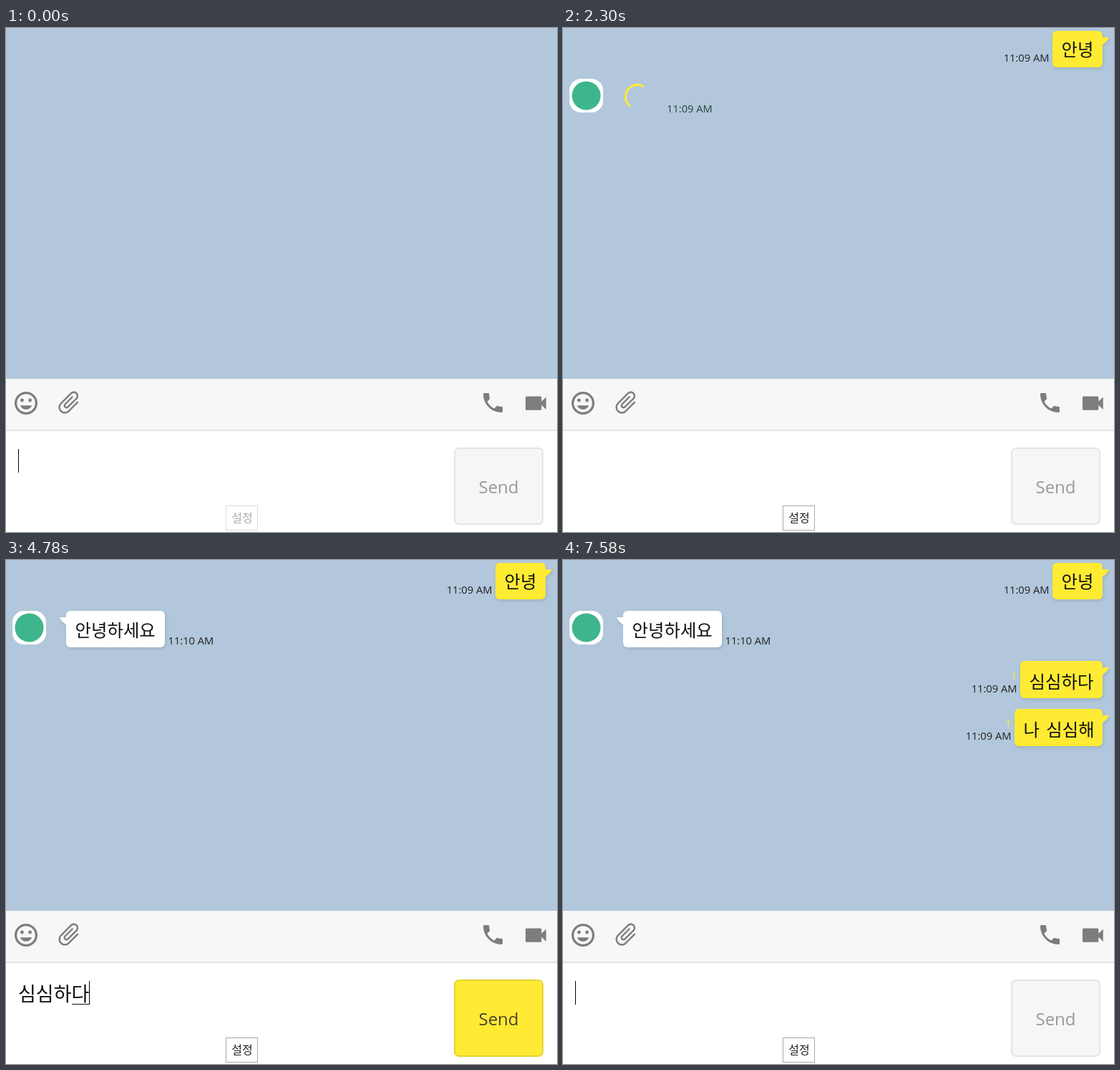
These frames come from a looping animation (770 by 704 pixels, 8 s). An HTML page:

```html
<!DOCTYPE html>
<html lang="ko">
<head>
<meta charset="utf-8">
<title>Chat</title>
<style>
  html, body { margin: 0; width: 100%; height: 100%; overflow: hidden; background: #fff; }
  svg { display: block; }
  text { white-space: pre; }
  .ko { font-family: "Noto Sans CJK KR", "Noto Sans KR", "Noto Sans CJK JP", "Noto Sans CJK", sans-serif; font-weight: 350; word-spacing: .1em; }
  .msg { font-size: 24.4px; fill: #111; }
  .typed { font-size: 27px; fill: #111; }
  .time, .unread { font-family: "Open Sans", "Noto Sans", sans-serif; font-size: 14.7px; fill: #222; }
  .unread { fill: #ffeb33; }
  .send { font-family: "Open Sans", "Noto Sans", sans-serif; font-size: 24px; }
  .bubble { filter: drop-shadow(1px 2px 2px rgba(0, 0, 0, .12)); }
</style>
</head>
<body>
<svg id="stage" width="770" height="704" viewBox="0 0 770 704">
  <rect width="770" height="704" fill="#fff"/>
  <rect width="770" height="490" fill="#b2c7db"/>
  <g id="chat"></g>

  <rect y="490" width="770" height="72" fill="#f7f7f7"/>
  <rect y="561" width="770" height="2" fill="#e4e4e4"/>
  <g fill="#7d7d7d">
    <g transform="translate(8.8 504.8) scale(1.6)">
      <circle cx="12" cy="12" r="9" fill="none" stroke="#7d7d7d" stroke-width="2"/>
      <circle cx="8.5" cy="9.5" r="1.5"/>
      <circle cx="15.5" cy="9.5" r="1.5"/>
      <path d="M12 17.5c2.33 0 4.31-1.46 5.11-3.5H6.89c.8 2.04 2.78 3.5 5.11 3.5z"/>
    </g>
    <path transform="translate(88.5 523.5) rotate(45) scale(1.6) translate(-12.5 -12)" d="M16.5 6v11.5c0 2.21-1.79 4-4 4s-4-1.79-4-4V5c0-1.38 1.12-2.5 2.5-2.5s2.5 1.12 2.5 2.5v10.5c0 .55-.45 1-1 1s-1-.45-1-1V6H10v9.5c0 1.38 1.12 2.5 2.5 2.5s2.5-1.12 2.5-2.5V5c0-2.21-1.79-4-4-4S7 2.79 7 5v12.5c0 3.04 2.46 5.5 5.5 5.5s5.5-2.46 5.5-5.5V6z"/>
    <path transform="translate(662.5 505.5) scale(1.5)" d="M6.62 10.79c1.44 2.83 3.76 5.14 6.59 6.59l2.2-2.2c.27-.27.67-.36 1.02-.24 1.12.37 2.33.57 3.57.57.55 0 1 .45 1 1V20c0 .55-.45 1-1 1-9.39 0-17-7.61-17-17 0-.55.45-1 1-1h3.5c.55 0 1 .45 1 1 0 1.25.2 2.45.57 3.57.11.35.03.74-.25 1.02l-2.2 2.2z"/>
    <path transform="translate(721.2 505) scale(1.6)" d="M17 10.5V7c0-.55-.45-1-1-1H4c-.55 0-1 .45-1 1v10c0 .55.45 1 1 1h12c.55 0 1-.45 1-1v-3.5l4 4v-11l-4 4z"/>
  </g>

  <text id="typed" class="ko typed" x="17" y="615.5"></text>
  <rect id="underline" y="620" height="1" fill="#111"/>
  <rect id="caret" y="588" width="1" height="33" fill="#000"/>

  <rect id="sendBox" x="627" y="587" width="123" height="106" rx="6" stroke-width="2"/>
  <text id="sendLabel" class="send" x="688.5" y="650" text-anchor="middle">Send</text>

  <rect id="setBox" x="307.5" y="667.5" width="44" height="34" fill="#fff"/>
  <text id="setLabel" class="ko" x="330" y="689.5" font-size="16" text-anchor="middle">설정</text>
</svg>
<script>
const LOOP = 8000;
const NS = "http://www.w3.org/2000/svg";
const YELLOW = "#ffeb33";
const $ = id => document.getElementById(id);

function add(parent, tag, attrs, text) {
  const el = document.createElementNS(NS, tag);
  for (const k in attrs) el.setAttribute(k, attrs[k]);
  if (text) el.textContent = text;
  parent.appendChild(el);
  return el;
}
function set(el, attrs) {
  for (const k in attrs) el.setAttribute(k, attrs[k]);
}
function show(el, on) {
  el.setAttribute("visibility", on ? "inherit" : "hidden");
}

// A message the user sent: bubble on the right, time and unread mark beside it.
function outgoing(x, y, h, timeY, textY, text) {
  const g = add($("chat"), "g", {});
  const b = add(g, "g", { class: "bubble", fill: YELLOW });
  add(b, "rect", { x, y, width: 754 - x, height: h, rx: 6 });
  add(b, "path", { d: `M753 ${y + 9}H763Q761 ${y + 15} 753 ${y + 20}Z` });
  add(g, "text", { class: "ko msg", x: x + 12.6, y: textY }, text);
  add(g, "text", { class: "time", x: x - 4.5, y: timeY, "text-anchor": "end" }, "11:09 AM");
  const unread = add(g, "text", { class: "unread", x: x - 4.5, y: timeY - 18, "text-anchor": "end" }, "1");
  return { g, unread };
}

const sent = [
  { at: 1380, read: 2300, ...outgoing(684, 4, 51, 47, 39.3, "안녕") },
  { at: 5250, read: LOOP, ...outgoing(639, 141, 52, 185, 179, "심심하다") },
  { at: 7580, read: LOOP, ...outgoing(631, 208, 52, 251, 246, "나 심심해") }
];

const avatar = add($("chat"), "g", {});
add(avatar, "rect", { x: 9, y: 71, width: 47, height: 47, rx: 16, fill: "#fff" });
add(avatar, "circle", { cx: 32.5, cy: 94.5, r: 20, fill: "#3fb58b" });

const waiting = add($("chat"), "g", {});
const arc = add(waiting, "path", { fill: "none", stroke: YELLOW, "stroke-width": 3 });
add(waiting, "text", { class: "time", x: 145, y: 118, style: "fill:#23493a" }, "11:09 AM");

const reply = add($("chat"), "g", {});
const replyBubble = add(reply, "g", { class: "bubble", fill: "#fff" });
add(replyBubble, "rect", { x: 84, y: 71, width: 138, height: 51, rx: 6 });
add(replyBubble, "path", { d: "M85 80H75Q77 86 85 91Z" });
add(reply, "text", { class: "ko msg", x: 96.6, y: 107 }, "안녕하세요");
add(reply, "text", { class: "time", x: 226.5, y: 118 }, "11:10 AM");

// Time, committed text, syllable being composed, caret hidden
const typing = [
  [0, "", ""], [370, "", "", 1], [450, "", "ㅇ"], [520, "", "아"], [670, "", "안"],
  [830, "안", "ㄴ"], [910, "안", "녀"], [980, "안", "녕"],
  [1290, "", ""], [1840, "", "", 1], [2380, "", ""], [2990, "", "", 1], [3530, "", ""],
  [3600, "", "ㅅ"], [3680, "", "시"], [3760, "", "심"],
  [4000, "심", "ㅅ"], [4080, "심", "시"], [4150, "심", "심"],
  [4380, "심심", "ㅎ"], [4550, "심심", "하"], [4610, "심심", "핟"], [4780, "심심하", "다"],
  [5160, "", ""], [5710, "", "ㄴ"], [5790, "", "나"], [5860, "나 ", ""],
  [6100, "나 ", "ㅅ"], [6170, "나 ", "시"], [6240, "나 ", "심"],
  [6480, "나 심", "ㅅ"], [6630, "나 심", "시"], [6710, "나 심", "심"],
  [6950, "나 심심", "ㅎ"], [7020, "나 심심", "해"], [7580, "", ""]
];

const width = s => [...s].reduce((w, c) => w + (c === " " ? 8.7 : 24.85), 0);

// Cubic ease-in-out with control points .42 and .58
function easeInOut(x) {
  let lo = 0, hi = 1;
  for (let i = 0; i < 24; i++) {
    const s = (lo + hi) / 2, q = 1 - s;
    if (3 * q * q * s * .42 + 3 * q * s * s * .58 + s * s * s < x) lo = s; else hi = s;
  }
  return lo * lo * (3 - 2 * lo);
}

// Turning ring whose dash first grows, then runs off its end
function drawSpinner(t) {
  const step = Math.floor((t - 2300) / 77.1 + .15);
  const p = ((2300 + step * 77.1 - 1905) / 1400) % 1;
  const k = easeInOut((p * 2) % 1);
  const full = 126.9;
  const offset = p < .5 ? 15 * k : 15 + 110 * k;
  const dash = Math.min(p < .5 ? 1 + 99 * k : 100, full - offset);
  const a = 2 * Math.PI * (p + offset / full);
  const sweep = 2 * Math.PI * dash / full;
  const at = v => `${104 + 16.6 * Math.cos(v)} ${96 + 16.6 * Math.sin(v)}`;
  arc.setAttribute("d", `M${at(a)}A16.6 16.6 0 ${sweep > Math.PI ? 1 : 0} 1 ${at(a + sweep)}`);
}

function drawInput(t) {
  const [, done, comp, hidden] = typing.findLast(row => row[0] <= t);
  const end = Math.floor(17 + width(done + comp));
  const start = Math.floor(18 + width(done));
  $("typed").textContent = done + comp;
  set($("caret"), { x: end });
  show($("caret"), !hidden);
  set($("underline"), { x: start, width: Math.max(0, end - start) });
  show($("underline"), comp);
  set($("sendBox"), done ? { fill: YELLOW, stroke: "#e5d32e" } : { fill: "#f6f6f6", stroke: "#e4e4e4" });
  set($("sendLabel"), { fill: done ? "#4a4230" : "#999" });
}

function render(t) {
  for (const m of sent) {
    show(m.g, t >= m.at);
    show(m.unread, t >= m.at && t < m.read);
  }
  const busy = t >= 2300 && t < 3920;
  show(avatar, t >= 2300);
  show(waiting, busy);
  show(reply, t >= 3920);
  if (busy) drawSpinner(t);
  drawInput(t);
  set($("setBox"), { stroke: t < 70 ? "#ddd" : "#aaa" });
  set($("setLabel"), { fill: t < 70 ? "#aaa" : "#222" });
}

const begin = performance.now();
function frame() {
  render((performance.now() - begin) % LOOP);
  requestAnimationFrame(frame);
}
render(0);
requestAnimationFrame(frame);
</script>
</body>
</html>
```
